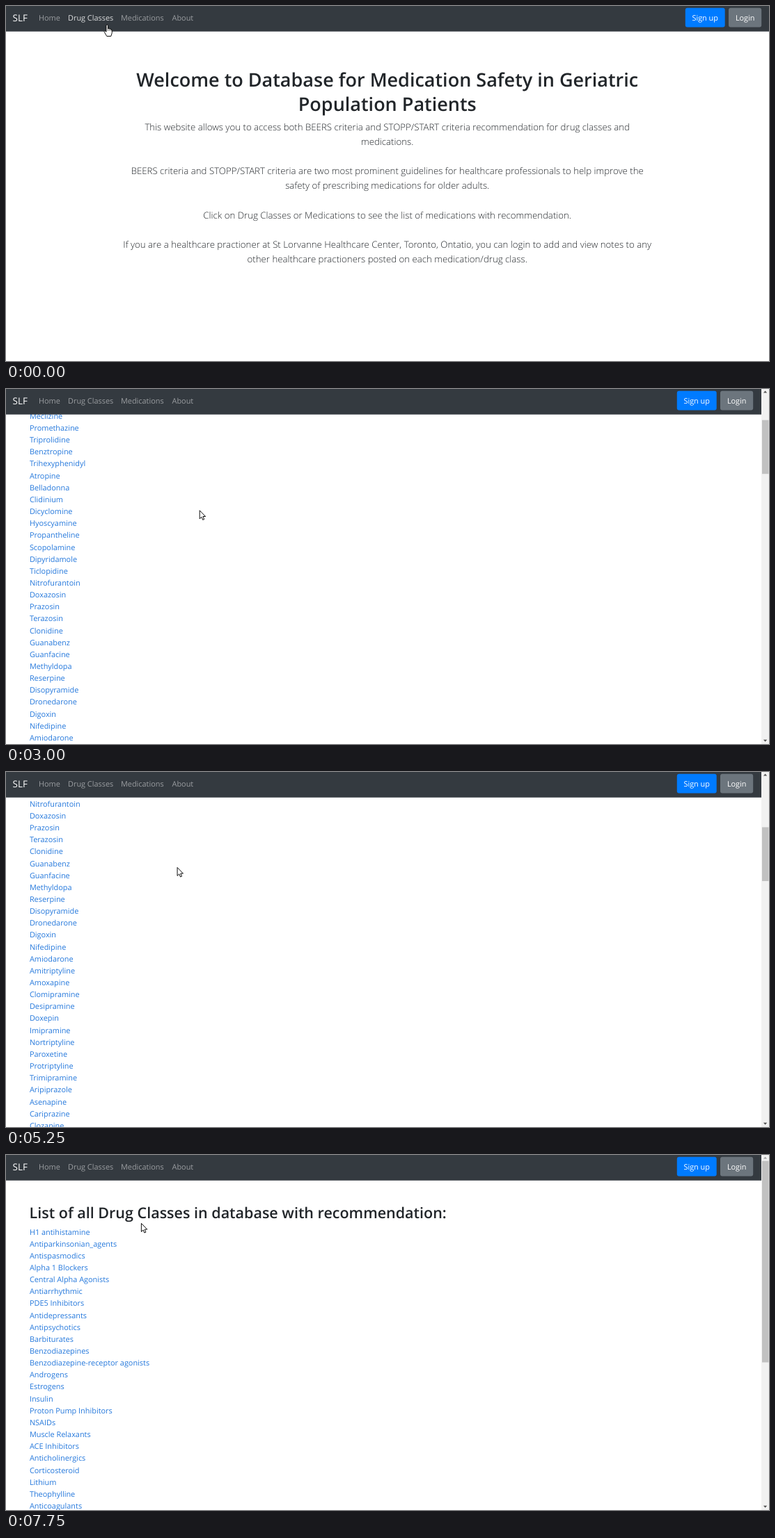
An HTML page that plays this animation: 1096x511 px, repeating every 8000 ms.

```html
<!DOCTYPE html>
<html lang="en">
<head>
<meta charset="utf-8">
<title>Medication safety database</title>
<style>
  html, body { margin: 0; width: 100%; height: 100%; overflow: hidden; background: #fff; }
  svg { display: block; width: 1096px; height: 511px; font-family: "Open Sans", "Noto Sans", sans-serif; text-rendering: geometricPrecision; }
  .title { font-size: 27px; font-weight: 600; fill: #212529; text-anchor: middle; }
  .lead { font-size: 13.24px; font-weight: 300; fill: #212529; text-anchor: middle; }
  .sub { font-size: 21.5px; font-weight: 600; fill: #212529; }
  .item { font-size: 10.9px; fill: #2478dc; }
  .nav { font-size: 10.9px; fill: #fff; }
  .brand { font-size: 13.4px; fill: #fff; }
  .btn { font-size: 10.9px; fill: #fff; text-anchor: middle; }
  .url { font-size: 8.05px; fill: #4a4d52; }
</style>
</head>
<body>
<svg id="stage" viewBox="0 0 1096 511"></svg>
<script>
const NS = "http://www.w3.org/2000/svg";
const LOOP = 8000, STEP = 250, ROW = 17.15;

function el(parent, tag, attrs, text) {
  const node = document.createElementNS(NS, tag);
  for (const k in attrs) node.setAttribute(k, attrs[k]);
  if (text) node.textContent = text;
  parent.appendChild(node);
  return node;
}
const label = (parent, cls, x, y, text) => el(parent, "text", { class: cls, x, y }, text);
const box = (parent, x, y, width, height, fill, rx = 0) =>
  el(parent, "rect", { x, y, width, height, fill, rx });
const show = (node, on) => node.setAttribute("visibility", on ? "visible" : "hidden");
const move = (node, x, y) => node.setAttribute("transform", `translate(${x} ${y})`);

const stage = document.getElementById("stage");

// Home page
const home = el(stage, "g", {});
label(home, "title", 547.7, 116.3, "Welcome to Database for Medication Safety in Geriatric");
label(home, "title", 547.7, 150.5, "Population Patients");
[
  "This website allows you to access both BEERS criteria and STOPP/START criteria recommendation for drug classes and",
  "medications.",
  "",
  "BEERS criteria and STOPP/START criteria are two most prominent guidelines for healthcare professionals to help improve the",
  "safety of prescribing medications for older adults.",
  "",
  "Click on Drug Classes or Medications to see the list of medications with recommendation.",
  "",
  "If you are a healthcare practioner at St Lorvanne Healthcare Center, Toronto, Ontatio, you can login to add and view notes to any",
  "other healthcare practioners posted on each medication/drug class."
].forEach((line, i) => label(home, "lead", 547.7, 178.8 + i * 21.15, line));

// List pages
function listPage(heading, names) {
  const page = el(stage, "g", {});
  label(page, "sub", 33.6, 91, heading);
  names.split(",").forEach((name, i) => label(page, "item", 33.9, 114.5 + i * ROW, name));
  return page;
}
const meds = listPage("List of all Medications in database with recommendation:",
  "Brompheniramine,Carbinoxamine,Clemastine,Cyproheptadine,Dexbrompheniramine,Dexchlorpheniramine," +
  "Dimenhydrinate,Diphenhydramine,Doxylamine,Hydroxyzine,Meclizine,Promethazine,Triprolidine,Benztropine," +
  "Trihexyphenidyl,Atropine,Belladonna,Clidinium,Dicyclomine,Hyoscyamine,Propantheline,Scopolamine," +
  "Dipyridamole,Ticlopidine,Nitrofurantoin,Doxazosin,Prazosin,Terazosin,Clonidine,Guanabenz,Guanfacine," +
  "Methyldopa,Reserpine,Disopyramide,Dronedarone,Digoxin,Nifedipine,Amiodarone,Amitriptyline,Amoxapine," +
  "Clomipramine,Desipramine,Doxepin,Imipramine,Nortriptyline,Paroxetine,Protriptyline,Trimipramine," +
  "Aripiprazole,Asenapine,Cariprazine,Clozapine,Lurasidone,Olanzapine,Quetiapine,Risperidone,Ziprasidone," +
  "Amobarbital,Butabarbital,Butalbital,Mephobarbital,Pentobarbital,Phenobarbital,Secobarbital,Alprazolam," +
  "Estazolam,Lorazepam,Oxazepam,Temazepam");
const classes = listPage("List of all Drug Classes in database with recommendation:",
  "H1 antihistamine,Antiparkinsonian_agents,Antispasmodics,Alpha 1 Blockers,Central Alpha Agonists," +
  "Antiarrhythmic,PDE5 Inhibitors,Antidepressants,Antipsychotics,Barbiturates,Benzodiazepines," +
  "Benzodiazepine-receptor agonists,Androgens,Estrogens,Insulin,Proton Pump Inhibitors,NSAIDs," +
  "Muscle Relaxants,ACE Inhibitors,Anticholinergics,Corticosteroid,Lithium,Theophylline,Anticoagulants");

// Navigation bar
box(stage, 0, 0, 1096, 36.7, "#343a40");
label(stage, "brand", 9.6, 22, "SLF");
const [, drugLink, medLink] = [["Home", 47], ["Drug Classes", 89], ["Medications", 165], ["About", 238.5]]
  .map(([text, x]) => label(stage, "nav", x, 21, text));
stage.querySelectorAll(".nav").forEach(n => n.setAttribute("fill-opacity", 0.5));

const buttons = el(stage, "g", {});
box(buttons, 975.8, 2.7, 56.9, 27.8, "#007bff", 3);
label(buttons, "btn", 1004.2, 21, "Sign up");
box(buttons, 1038, 2.7, 47.2, 27.8, "#6c757d", 3);
label(buttons, "btn", 1061.7, 21, "Login");

// Scrollbar
const bar = el(stage, "g", {});
box(bar, 1085, 0, 11, 511, "#f1f1f1");
const thumb = box(bar, 1086, 8.5, 9.5, 77.5, "#c1c1c1");
const upArrow = el(bar, "path", { d: "M1088 5.5L1090.6 2.6L1093.2 5.5Z" });
el(bar, "path", { d: "M1088 504.8L1090.6 507.7L1093.2 504.8Z", fill: "#505050" });

// Link address bubble
const bubble = el(stage, "g", {});
box(bubble, -3, 496, 117, 18, "#dee1e6", 2);
const url = label(bubble, "url", 2, 507, "");

// Pointers, with the hot spot at 0,0
const ink = { fill: "#fff", stroke: "#000", "stroke-width": 0.95, "stroke-linejoin": "round" };
const arrow = el(stage, "path", { d: "M.4 .4V12.4L3.1 9.9L4.9 14L6.9 13.1L5.1 9.1H8.8Z", ...ink });
const hand = el(stage, "g", {});
el(hand, "path", {
  d: "M-1 9V1.2Q-1 0 .2 0T1.4 1.2V6Q1.6 5 2.6 5.2Q3.6 5.3 3.7 6.3Q4.2 5.7 5 6Q5.8 6.2 5.9 7" +
     "Q7.3 6.8 7.3 8.2V11.5L5.8 16.5H-.2L-3.7 10.6Q-4.3 9.4 -3.2 8.9Q-2.2 8.6 -1 10.2Z", ...ink
});
el(hand, "path", { d: "M1.4 6V9M3.7 6.5V9M5.9 7V9.2", stroke: "#000", "stroke-width": 0.6 });

// Rows of time followed by values
const pointerKeys = [
  [0, 145, 27], [750, 189, 23], [1250, 189, 23], [2000, 279, 169], [2250, 279, 169],
  [3500, 277, 178], [4250, 276.5, 177], [5000, 276.5, 177], [5750, 184, 57],
  [6250, 146, 19], [7000, 206, 93], [7500, 206, 93], [7750, 194, 98]
];
const scrollKeys = [
  [0, 0], [2000, 0], [2250, 71.5], [3500, 357.5], [4250, 618.3], [4750, 714.5], [5000, 714.5], [5750, 0]
];

function sample(keys, t) {
  const i = keys.findIndex(k => k[0] > t);
  if (i < 0) return keys[keys.length - 1].slice(1);
  const a = keys[i - 1], b = keys[i], p = (t - a[0]) / (b[0] - a[0]);
  return a.slice(1).map((v, j) => v + (b[j + 1] - v) * p);
}

function draw(ms) {
  const t = Math.floor((ms % LOOP) / STEP) * STEP;
  const within = (from, to) => t >= from && t < to;
  const isHome = t < 1500, isMeds = within(1500, 7500), isClasses = t >= 7500;
  const [scroll] = sample(scrollKeys, t);
  const [x, y] = sample(pointerKeys, t);

  show(home, isHome);
  show(meds, isMeds);
  show(classes, isClasses);
  show(bar, !isHome);
  move(meds, 0, -scroll);
  move(buttons, isHome ? 0 : -12, 0);

  thumb.setAttribute("y", 8.5 + scroll * 0.149);
  thumb.setAttribute("height", isClasses ? 290 : 77.5);
  upArrow.setAttribute("fill", scroll > 0 ? "#505050" : "#a3a3a3");

  drugLink.setAttribute("fill-opacity", t < 250 || within(6250, 7500) ? 0.82 : 0.5);
  medLink.setAttribute("fill-opacity", within(250, 1500) ? 0.88 : 0.5);

  show(bubble, within(500, 1500) || within(6500, 7500));
  url.textContent = "127.0.0.1:5000/" + (isHome ? "medications/" : "drugclasses/");

  const pointing = t < 1250 || within(6250, 6500);
  show(hand, pointing);
  show(arrow, !pointing);
  move(pointing ? hand : arrow, x, y);
}

const start = performance.now();
function tick() {
  draw(performance.now() - start);
  requestAnimationFrame(tick);
}
tick();
</script>
</body>
</html>
```
